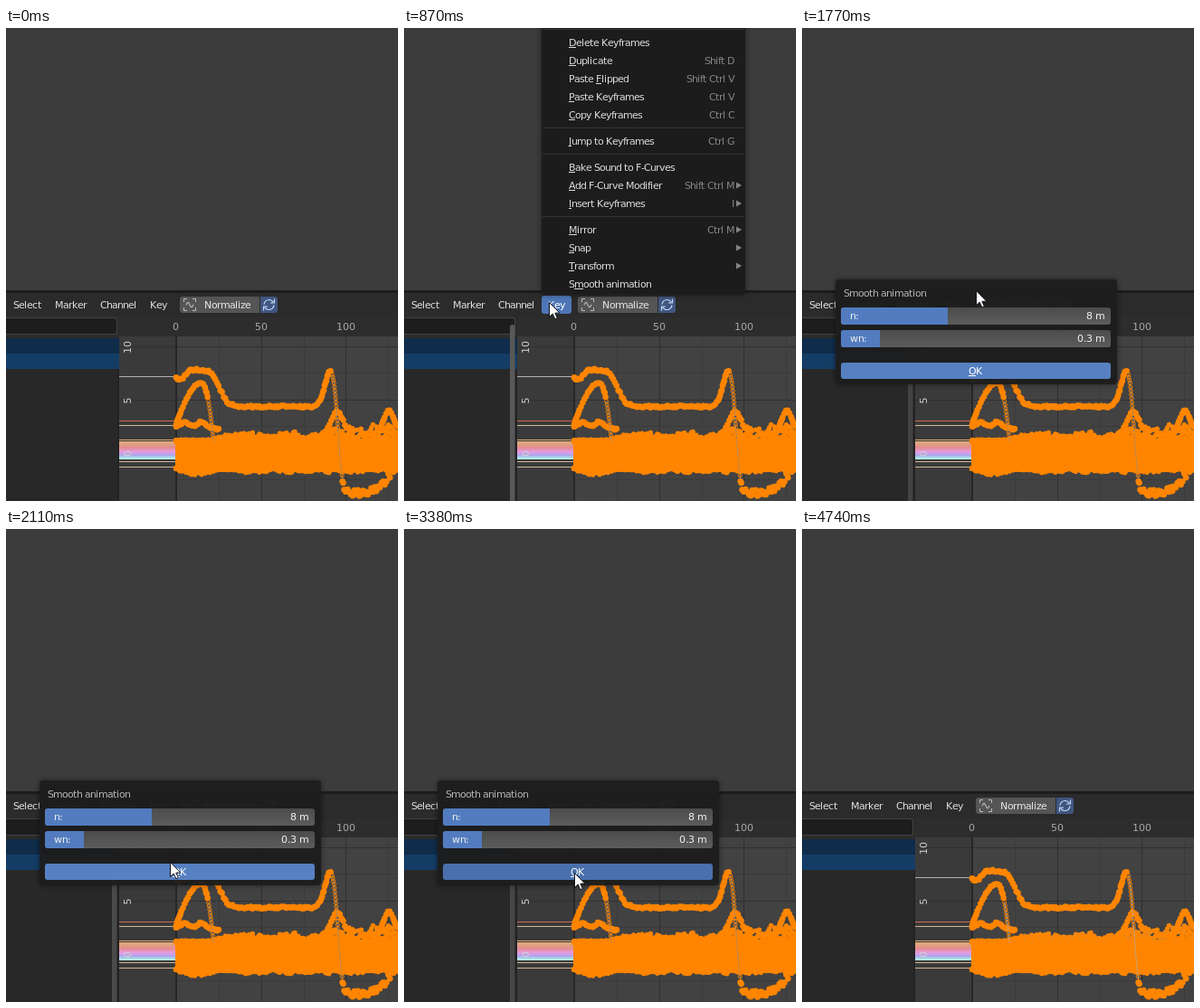
Write an HTML page with a canvas that moves like this. It is 433 px wide and 523 px high and loops after 5.95 s.

```html
<!DOCTYPE html>
<html lang="en">
<head>
<meta charset="utf-8">
<title>Smooth animation operator</title>
<style>
  html, body { margin: 0; width: 100%; height: 100%; overflow: hidden; background: #3c3c3c; }
  canvas { display: block; }
</style>
</head>
<body>
<canvas id="stage" width="433" height="523"></canvas>
<script>
const W = 433, H = 523, LOOP = 5950;
const ctx = document.getElementById('stage').getContext('2d');
const ORANGE = '#ff8500', BLUE = '#5680c2', FONT = '"DejaVu Sans", sans-serif';
const LEFT = 188, FRAME = 1.874;

// Times of the hard changes, in ms
const T = { enter: 110, menu: 780, dialog: 1490, press: 3240, apply: 3610, leave: 4740 };
const clicks = [[780, 870], [1420, 1490], [3240, 3380]];

// Pointer moves: start, end, steps, target x, target y
const HOME = [315, 490];
const moves = [
  [158, 690, 12, 160, 303],
  [1060, 1420, 7, 193, 283],
  [1770, 2110, 8, 181, 368],
  [2160, 2360, 5, 113, 385],
  [2410, 2460, 2, 108, 381],
  [2600, 2780, 4, 188, 380],
  [4400, 4690, 7, 343, 484]
];

// Label, shortcut, submenu; null is a separator, & comes before the underlined letter
const menuRows = [
  null, ['&Delete Keyframes'], ['&Duplicate', 'Shift D'], ['Paste &Flipped', 'Shift Ctrl V'],
  ['&Paste Keyframes', 'Ctrl V'], ['&Copy Keyframes', 'Ctrl C'],
  null, ['&Jump to Keyframes', 'Ctrl G'],
  null, ['&Bake Sound to F-Curves'], ['&Add F-Curve Modifier', 'Shift Ctrl M', true], ['&Insert Keyframes', 'I', true],
  null, ['&Mirror', 'Ctrl M', true], ['&Snap', '', true], ['&Transform', '', true], ['S&mooth animation']
];

const bump = (x, c, w) => Math.exp(-(((x - c) / w) ** 2));
const step = (x, c, w) => 1 / (1 + Math.exp((c - x) / w));

// F-curves as height over x
const high = x => 377.5 + 11 * bump(x, 192, 8) + 41 * step(x, 236, 4.5) - 41 * bump(x, 359, 9)
  + 96 * step(x, 367, 2.2) - 30 * step(x, 420, 6);
const hump = x => x < 214 ? 392 + 46 * ((214 - x) / 26) ** 1.6 : 392 + 63 * ((x - 214) / 15) ** 2.5;
const low = x => 438 + 2.5 * Math.cos((x - LEFT) / 3) + 11 * step(x, 231, 3);
const peak = x => 449 - 25 * bump(x, 366, 9);
const tail = x => 452 - 29 * bump(x, 423, 9);

function rng(seed) {
  return () => (seed = (seed * 16807) % 2147483647) / 2147483647;
}

function makeNoise(rand, gap) {
  const v = Array.from({ length: 60 }, rand);
  return x => {
    const p = (x - LEFT) / gap, i = Math.floor(p), u = p - i;
    return v[i] + (v[i + 1] - v[i]) * u;
  };
}

function makePlot(smooth) {
  const layer = document.createElement('canvas');
  layer.width = W; layer.height = H;
  const g = layer.getContext('2d'), rand = rng(71);
  const roughTop = makeNoise(rand, 6), roughBottom = makeNoise(rand, 6);

  function dot(x, y, r = 3.3) {
    g.fillStyle = ORANGE;
    g.beginPath(); g.arc(x, y, r, 0, 7); g.fill();
  }
  function ring(x, y, r, color) {
    g.strokeStyle = color; g.lineWidth = 1;
    g.beginPath(); g.arc(x, y, r, 0, 7); g.stroke();
  }
  function trace(f, from, to, wobble) {
    for (let x = from; x < to; x += FRAME) {
      const y = f(x), dy = f(x + FRAME) - y;
      const steep = Math.abs(dy) > 9, n = Math.ceil(Math.abs(dy) / 4.5);
      if (steep) {
        g.strokeStyle = smooth ? '#b0b0b0' : '#9a8a78'; g.lineWidth = 1;
        g.beginPath(); g.moveTo(x, y); g.lineTo(x + FRAME, y + dy); g.stroke();
      }
      for (let k = 0; k < n; k++) {
        const px = x + FRAME * k / n, py = y + dy * k / n;
        if (steep) ring(px, py, 2, ORANGE);
        else dot(px, py + (rand() - .5) * (py > 490 ? 8 : wobble));
      }
    }
  }

  g.fillStyle = ORANGE;
  g.fillRect(187, 456, 246, 31);
  for (let x = LEFT; x < W + 2; x += FRAME) {
    const top = 455 - 3 * step(x, 234, 2) - 8 * step(x, 362, 5) - 7 * roughTop(x) * step(x, 230, 2);
    const bottom = 487 + 6 * roughBottom(x) + 8 * bump(x, 213, 9);
    dot(x, 456 + rand() * 2);
    dot(x, 486 + rand() * 2);
    for (let k = 0; k < 3; k++) {
      const y = top + (457 - top) * rand();
      dot(x, y, 2.6);
      dot(x, 486 + (bottom - 486) * rand(), 2.6);
      if (smooth && k === 1) ring(x, y, 1.6, '#d98a35');
    }
  }
  trace(low, LEFT, 236, 2);
  trace(hump, LEFT, 229, 1.5);
  trace(peak, 350, 378, 2);
  trace(tail, 405, W, 1.5);
  trace(high, LEFT, W, 2.6);
  return layer;
}

const rawPlot = makePlot(false), smoothPlot = makePlot(true);

function rect(x, y, w, h, fill) {
  ctx.fillStyle = fill;
  ctx.fillRect(x, y, w, h);
}

function box(x, y, w, h, r, fill) {
  ctx.fillStyle = fill;
  ctx.beginPath(); ctx.roundRect(x, y, w, h, r); ctx.fill();
}

function line(color, width, ...pts) {
  ctx.strokeStyle = color; ctx.lineWidth = width;
  ctx.beginPath();
  for (let i = 0; i < pts.length; i += 2) ctx.lineTo(pts[i], pts[i + 1]);
  ctx.stroke();
}

// Interface text advances by whole pixels
const advances = {};
function advance(ch) {
  if (!(ch in advances)) {
    ctx.font = '110px ' + FONT;
    advances[ch] = Math.floor(ctx.measureText(ch).width / 10 + .005);
  }
  return advances[ch];
}

function text(label, x, mid, color, align = 0) {
  const mark = label.indexOf('&'), chars = [...label.replace('&', '')];
  x -= Math.round(chars.reduce((sum, ch) => sum + advance(ch), 0) * align);
  chars.forEach((ch, i) => {
    const w = advance(ch);
    ctx.font = '11px ' + FONT;
    ctx.fillStyle = color;
    ctx.fillText(ch, x, mid + 4);
    if (i === mark) ctx.fillRect(x, mid + 5, w, 1);
    x += w;
  });
}

function pointerAt(t) {
  let [px, py] = HOME;
  for (const [t0, t1, n, x, y] of moves) {
    if (t < t0) break;
    const k = Math.min(n, Math.floor((t - t0) / ((t1 - t0) / (n - 1)) + .05) + 1);
    const u = k / n, e = (u + u * u * (3 - 2 * u)) / 2;
    px += (x - px) * e;
    py += (y - py) * e;
  }
  return [px, py];
}

const inside = (p, x, y, w, h) => p[0] >= x && p[0] < x + w && p[1] >= y && p[1] < y + h;

function drawGraph(smooth) {
  rect(125, 320, 308, 203, '#424242');
  rect(125, 320, 63, 203, '#3a3a3a');
  for (let i = 0; i < 6; i++) {
    const shade = i % 2 ? '#3b3b3b' : '#303030';
    rect(Math.round(LEFT + i * 46.85), 341, 1, 182, shade);
    rect(125, Math.round(352 + i * 29.3), 308, 1, shade);
  }
  rect(187, 341, 2, 182, '#262626');
  rect(125, 320, 308, 21, '#2d2d2d');
  for (let i = 0; i < 3; i++) text(String(i * 50), LEFT + i * 94, 330, '#a8a8a8', .5);

  // Values held before the first key
  for (const y of [385, 434, 439, 479, 485]) {
    rect(125, y, 63, 1, y === 434 ? '#d2694c' : y < 400 ? '#b5adb5' : '#d0b496');
  }
  for (let i = 0; i < 11; i++) {
    rect(125, 455 + i * 2, 63, i ? 2 : 1, `hsl(${390 - 2.2 * i * i}, 60%, ${66 + i * 1.5}%)`);
  }

  for (let i = 0; i < 3; i++) {
    ctx.save();
    ctx.translate(134, 353 + i * 58.5);
    ctx.rotate(-Math.PI / 2);
    text(String(10 - i * 5), 0, 0, '#d0d0d0', .5);
    ctx.restore();
  }
  ctx.drawImage(smooth ? smoothPlot : rawPlot, 0, 0);
}

function drawChannels(glow) {
  rect(0, 320, 125, 203, '#282828');
  rect(0, 320, 125, 23, '#2b2b2b');
  box(-6, 320, 129, 19, 3, '#424242');
  box(-6, 321, 128, 17, 3, '#1d1d1d');
  rect(0, 343, 125, 17, '#0f2c4b');
  rect(0, 360, 125, 17, '#143d66');
  rect(123, 377, 2, 146, '#222');
  ctx.globalAlpha = glow;
  box(117, 328, 5.5, 205, 2.7, '#585858');
  ctx.globalAlpha = 1;
}

function drawHeader(keyLit) {
  rect(0, 290, W, 3, '#1c1c1c');
  rect(0, 293, W, 27, '#2b2b2b');
  if (keyLit) box(152, 296, 33, 20, 3, '#4f76b7');
  text('Select', 8, 306, '#dedede');
  text('Marker', 54, 306, '#dedede');
  text('Channel', 104, 306, '#dedede');
  text('Key', 159, 306, keyLit ? '#fff' : '#dedede');

  box(192, 297, 88, 18, [3, 0, 0, 3], '#555');
  box(281, 297, 19, 18, [0, 3, 3, 0], '#405680');
  text('Normalize', 219, 306, '#e6e6e6');

  // Curve icon in four corner brackets
  for (const sx of [-1, 1]) {
    for (const sy of [-1, 1]) {
      line('#bdbdbd', 1, 203 + sx * 6.5, 306 + sy * 3, 203 + sx * 6.5, 306 + sy * 6.5, 203 + sx * 3, 306 + sy * 6.5);
    }
  }
  const wave = [];
  for (let x = -4; x <= 4; x++) wave.push(203 + x, 306 + 2.8 * Math.sin(x * .8));
  line('#bdbdbd', 1.1, ...wave);

  for (const turn of [0, Math.PI]) {
    ctx.save();
    ctx.translate(290.5, 306);
    ctx.rotate(turn);
    ctx.strokeStyle = '#c3daf8'; ctx.lineWidth = 1.2;
    ctx.beginPath(); ctx.arc(0, 0, 5.5, Math.PI * 1.02, Math.PI * 1.85); ctx.stroke();
    line('#c3daf8', 1.2, 6, -6.5, 6, -2, 1.5, -2);
    ctx.restore();
  }
}

function drawMenu(p) {
  ctx.save();
  ctx.shadowColor = 'rgba(0,0,0,.5)'; ctx.shadowBlur = 6;
  box(152, -10, 225, 304.5, 3, '#1c1c1c');
  ctx.restore();
  let y = 7;
  for (const row of menuRows) {
    if (!row) {
      rect(153, y - 6, 223, 1, '#353535');
      y += 9;
      continue;
    }
    const [label, keys = '', sub] = row;
    const lit = inside(p, 152, y - 10, 225, 20);
    if (lit) rect(153, y - 9, 223, 18, '#5079bb');
    text(label, 182, y, lit ? '#fff' : '#dcdcdc');
    text(keys, 365, y, '#858585', 1);
    if (sub) {
      ctx.fillStyle = '#858585';
      ctx.beginPath();
      ctx.moveTo(367, y - 3.5); ctx.lineTo(373, y); ctx.lineTo(367, y + 3.5);
      ctx.fill();
    }
    y += 20;
  }
}

function drawSlider(label, value, y, fillTo, p) {
  const lit = inside(p, 43, y, 298, 19);
  const shade = ctx.createLinearGradient(0, y, 0, y + 19);
  shade.addColorStop(0, lit ? '#606060' : '#4c4c4c');
  shade.addColorStop(1, lit ? '#6d6d6d' : '#5c5c5c');
  box(43, y, 298, 19, 3, shade);
  box(43, y, fillTo - 43, 19, [3, 0, 0, 3], lit ? '#6089cb' : '#527cbf');
  text(label, 53, y + 9, '#f0f0f0');
  text(value, 334, y + 9, '#f0f0f0', 1);
}

function drawDialog(p, pressed) {
  ctx.save();
  ctx.shadowColor = 'rgba(0,0,0,.5)'; ctx.shadowBlur = 6;
  box(37, 278, 311, 116, 4, 'rgba(30,30,30,.95)');
  ctx.restore();
  text('Smooth animation', 46, 293, '#b4b4b4');
  drawSlider('n:', '8 m', 309, 161, p);
  drawSlider('wn:', '0.3 m', 334, 86, p);
  const lit = inside(p, 43, 370, 298, 18);
  box(43, 370, 298, 18, 3, pressed ? '#4a70ad' : lit ? '#7a9cd9' : BLUE);
  text('&OK', 192, 379, '#fff', .5);
}

function drawPointer([x, y], clicked) {
  if (clicked) {
    ctx.fillStyle = 'rgba(232,220,30,.8)';
    ctx.beginPath(); ctx.arc(x, y, 12, 0, 7); ctx.fill();
  }
  ctx.save();
  ctx.translate(x, y);
  ctx.beginPath();
  for (const [a, b] of [[.5, .5], [.5, 16.5], [4.2, 13], [6.8, 18.7], [9.3, 17.6], [6.8, 12.2], [11.8, 12]]) {
    ctx.lineTo(a, b);
  }
  ctx.closePath();
  ctx.fillStyle = '#fff'; ctx.fill();
  ctx.strokeStyle = '#15151f'; ctx.lineWidth = 1; ctx.stroke();
  ctx.restore();
}

function draw(t) {
  const within = (a, b) => t >= a && t < b;
  const shown = within(T.enter, T.leave);
  const p = pointerAt(t);
  const menu = within(T.menu, T.dialog), dialog = within(T.dialog, T.apply);
  const overKey = shown && !dialog && inside(p, 152, 296, 33, 20);
  // The scrollbar fades with the pointer's distance
  const glow = shown ? Math.min(1, Math.max(0, 1 - (p[0] - 160) / 75)) : 0;

  rect(0, 0, W, H, '#3c3c3c');
  drawGraph(t >= T.apply);
  drawChannels(glow);
  drawHeader(menu || overKey);
  if (menu) drawMenu(p);
  if (dialog) drawDialog(p, t >= T.press);
  if (shown) drawPointer(p, clicks.some(([a, b]) => within(a, b)));
}

const start = performance.now();
function tick() {
  draw((performance.now() - start) % LOOP);
  requestAnimationFrame(tick);
}
tick();
</script>
</body>
</html>
```
